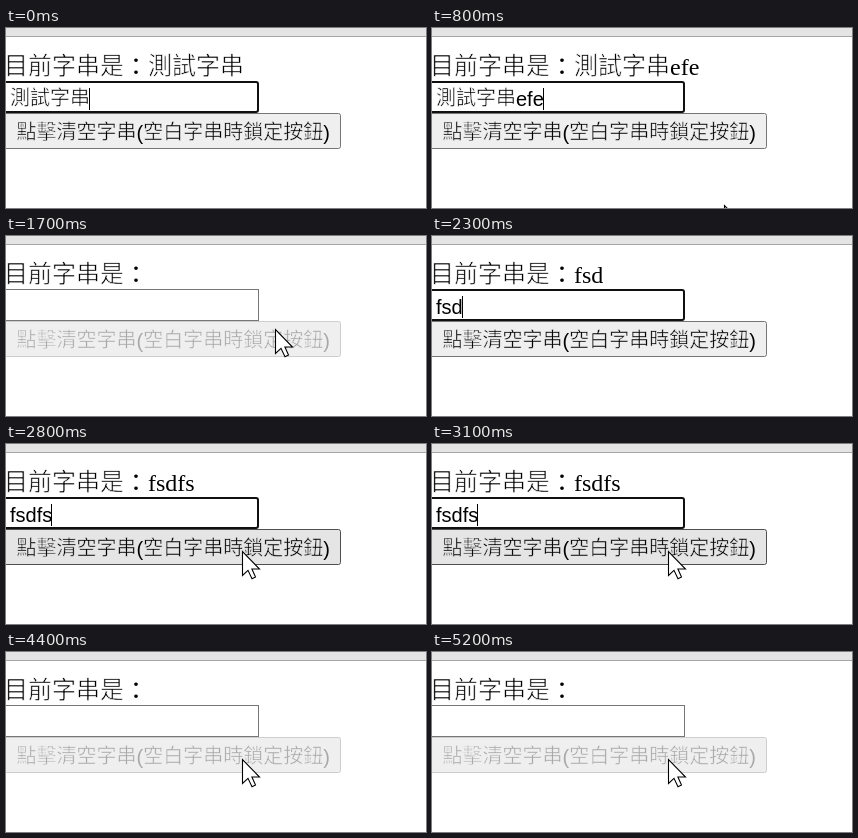
Recreate the animation shown at these times as an HTML page. Size 420x180 px, loop 5300 ms.

```html
<!DOCTYPE html>
<html lang="zh-Hant">
<head>
<meta charset="utf-8">
<style>
html, body { margin: 0; width: 100%; height: 100%; overflow: hidden; background: #fff; }
svg { display: block; width: 420px; height: 180px; --bg: #fff; }
text { white-space: pre; }
.page { font-size: 24px; font-family: "Liberation Serif", "Noto Sans CJK TC", serif; }
.ui { font-size: 20px; font-family: "Liberation Sans", "Noto Sans CJK TC", sans-serif; }
/* a stroke in the background colour gives a light weight */
.cjk { stroke: var(--bg); stroke-width: 0.027em; baseline-shift: 0.8px; }
#field { y: 53.5px; width: 260.5px; height: 31px; fill: #fff; stroke: #767676; }
.focus #field { y: 54px; width: 260px; height: 30px; rx: 2px; stroke: #101010; stroke-width: 2; }
#caret { visibility: hidden; }
.focus #caret { visibility: visible; }
#button { --bg: #efefef; }
#button rect { fill: var(--bg); stroke: #767676; }
#button.hover { --bg: #e5e5e5; }
#button.hover rect { stroke: #4f4f4f; }
#button.off rect { stroke: #cdcdcd; }
#button.off text { fill: #a8a8a8; }
</style>
</head>
<body>
<svg id="stage" viewBox="0 0 420 180">
  <rect width="420" height="8" fill="#e4e4e4"/>
  <rect y="8" width="420" height="1" fill="#a6a6a6"/>
  <text id="label" class="page" x="-2" y="47"></text>
  <rect id="field" x="-8"/>
  <text id="value" class="ui" x="4" y="77.5"></text>
  <rect id="caret" y="60" width="1" height="22"/>
  <g id="button">
    <rect x="-8" y="85.5" width="342.5" height="35" rx="2"/>
    <text id="caption" class="ui" x="10.5" y="112"></text>
  </g>
  <path id="pointer" d="M0 0V24L5.5 18.8L9.5 27.2L13 25.6L9.4 17.5H17Z" fill="#fff" stroke="#000" stroke-width="1.1"/>
</svg>
<script>
const LOOP = 5300, STEP = 100;
const $ = id => document.getElementById(id);

function setText(id, text) {
  $(id).innerHTML = text.replace(/[\u4e00-\u9fff]+/g, '<tspan class="cjk">$&</tspan>');
}

// [time, value, focused]
const edits = [[0, "測試字串", true]];
function type(text, times) {
  let value = edits[edits.length - 1][1];
  times.forEach((time, i) => edits.push([time, value += text[i], true]));
}
type("efeerg23", [400, 500, 600, 900, 1000, 1100, 1200, 1300]);
edits.push([1600, "", false], [2000, "", true]);
type("fsdfs", [2100, 2200, 2300, 2400, 2500]);
edits.push([3200, "", false]);

// [time, x, y]
const moves = [
  [800, 292, 177], [1000, 292, 166], [1200, 288, 128], [1500, 269, 93],
  [1800, 269, 93], [2000, 225, 72], [2500, 225, 72], [2700, 236, 107], [LOOP, 236, 107]
];

function pointerAt(t) {
  const i = moves.findIndex(m => m[0] > t);
  if (i < 1) return null;
  const [t0, x0, y0] = moves[i - 1], [t1, x1, y1] = moves[i];
  const k = (t - t0) / (t1 - t0);
  return [x0 + (x1 - x0) * k, y0 + (y1 - y0) * k];
}

function draw(now) {
  const t = Math.floor(now % LOOP / STEP) * STEP;
  const [, value, focused] = edits.filter(e => e[0] <= t).pop();
  setText("label", "目前字串是：" + value);
  setText("value", value);
  $("stage").classList.toggle("focus", focused);
  $("caret").setAttribute("x", Math.round(4 + (value ? $("value").getComputedTextLength() : 0)) - 1);

  const pos = pointerAt(t);
  const typing = t >= 2000 && t <= 2500;
  $("pointer").style.visibility = pos && !typing ? "visible" : "hidden";
  if (pos) $("pointer").setAttribute("transform", `translate(${pos.map(v => Math.round(v) + 0.5)})`);

  const over = pos && pos[1] > 85 && pos[1] < 121;
  $("button").setAttribute("class", !value ? "off" : over ? "hover" : "");
}

setText("caption", "點擊清空字串(空白字串時鎖定按鈕)");
const start = performance.now();
function tick() {
  draw(performance.now() - start);
  requestAnimationFrame(tick);
}
tick();
</script>
</body>
</html>
```
